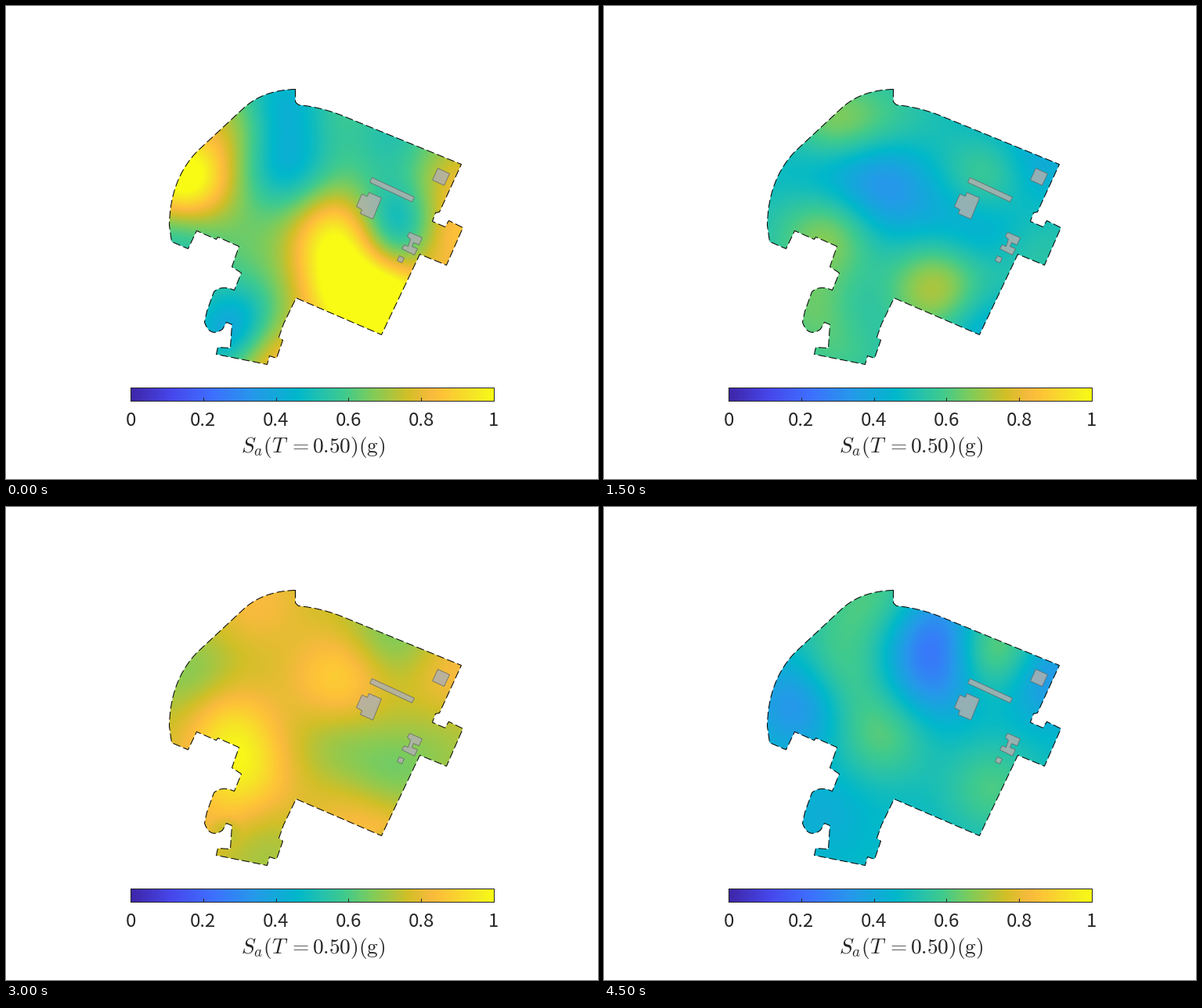
Recreate the animation shown at these times as a matplotlib script. Size 756x605 px, loop 5000 ms.

```python
import numpy as np
import matplotlib.pyplot as plt
from matplotlib.animation import FuncAnimation
from matplotlib.colors import LinearSegmentedColormap
from matplotlib.patches import Polygon, Rectangle

W, H, DPI = 756, 605, 100
PX = 72 / DPI  # one pixel in points
INK = "#262626"
plt.rcParams["mathtext.fontset"] = "cm"

STOPS = {0: "#3e26a8", 7: "#4747eb", 14: "#3e6fff", 21: "#2797eb",
         29: "#01b8ca", 33: "#24c1ae", 37: "#3fca8e", 42: "#81cc59",
         48: "#d1bf27", 52: "#f8ba3d", 54: "#fec338", 60: "#f5e924",
         63: "#f9fb15"}
CMAP = LinearSegmentedColormap.from_list(
    "sea_to_sun", [(k / 63, c) for k, c in STOPS.items()])


def bend(a, ctrl, b, n=16):
    """Quadratic curve from a to b."""
    t = np.linspace(0, 1, n)[:, None]
    a, ctrl, b = map(np.array, (a, ctrl, b))
    return [*((1 - t) ** 2 * a + 2 * t * (1 - t) * ctrl + t * t * b)]


def box(cx, cy, w, h, turn=np.radians(24.8)):
    """Corners of a turned rectangle."""
    u = np.array([np.cos(turn), np.sin(turn)]) * w / 2
    v = np.array([-np.sin(turn), np.cos(turn)]) * h / 2
    return [(cx, cy) + i * u + j * v
            for i, j in ((-1, -1), (1, -1), (1, 1), (-1, 1))]


SITE = [
    (369, 106), (369, 122), *bend((373, 126), (405, 129), (437, 143)),
    (581, 202), (553, 263), (548, 264), (544, 275), (560, 282), (565, 274),
    (583, 283), (562, 331), (528, 317), (479, 420), (370, 373), (354, 406),
    (348, 423), (353, 427), (345, 450), (336, 447), (333, 458), (268, 445),
    (270, 436), (286, 437), (288, 407), (281, 404),
    *bend((276, 413), (260, 424), (253, 404)), (256, 390),
    *bend((265, 365), (275, 356), (291, 363)), (300, 341), (288, 333),
    (297, 307), (270, 295), (268, 298), (243, 287), (232, 310), (211, 301),
    *bend((208, 280), (209, 222), (243, 186)),
    *bend((303, 130), (328, 107), (369, 106))]

HALL = [(454, 240), (461, 243), (463, 238), (479, 245), (468, 272),
        (452, 265), (454, 260), (447, 256)]
WINGS = [(515, 289), (531, 296), (527, 305), (520, 302), (518, 307),
         (525, 310), (521, 318), (505, 310), (508, 305), (513, 307),
         (516, 298), (512, 294)]
BUILDINGS = [box(555, 218, 16.5, 16.5), box(492.5, 234.5, 59.5, 6.7),
             box(503.5, 323.5, 6.7, 6.7), HALL, WINGS]

# Field raster: one sample per pixel over the site
X0, X1, Y0, Y1 = 205, 587, 103, 461
GX, GY = np.meshgrid(np.arange(X0, X1 + 1.0), np.arange(Y0, Y1 + 1.0))


def field(mean, *points, reach=42):
    """Smooth surface through key points (x, y, value), else near the mean."""
    px, py, v = np.array(points, float).T

    def bell(x, y, k=slice(None)):
        return np.exp(-((x - px[k]) ** 2 + (y - py[k]) ** 2) / (2 * reach ** 2))

    weights = np.linalg.solve(bell(px[:, None], py[:, None]), v - mean)
    out = mean + sum(w * bell(GX, GY, k) for k, w in enumerate(weights))
    return np.clip(out, 0, 1)


ridge = field(.65, (225, 222, 1.05), (262, 252, .82), (215, 295, .58),
              (350, 120, .44), (357, 205, .44), (290, 150, .70),
              (493, 165, .53), (498, 283, .52), (573, 225, .80),
              (565, 300, .83), (425, 295, 1.0), (432, 365, 1.15),
              (490, 390, 1.2), (295, 418, .44), (335, 450, .78))

hollows = field(1.35, (493, 230, .68), (535, 258, .87), (500, 357, .58),
                (290, 362, .85), (228, 215, .94), reach=36)

peaks = field(.46, (292, 150, .83), (350, 125, .57), (425, 150, .53),
              (490, 212, .74), (555, 205, .27), (350, 290, .37),
              (500, 270, .57), (545, 310, .58), (422, 360, .84),
              (480, 400, .35), (310, 400, .37))

valley = field(.50, (358, 145, .60), (355, 222, .22), (285, 210, .33),
               (487, 172, .36), (430, 258, .32), (490, 295, .36),
               (570, 215, .60), (285, 290, .89), (222, 285, .66),
               (335, 310, .74), (265, 385, .87), (310, 440, .78),
               (425, 380, .60), (490, 350, .57))

plateau = field(1.6, (266, 406, .95), (294, 420, .95), (485, 430, .85),
                reach=36)

shore = field(.50, (318, 120, .66), (425, 218, .75), (492, 165, .34),
              (570, 210, .64), (235, 215, .37), (285, 285, .90),
              (305, 345, .92), (425, 305, .39), (495, 345, .32),
              (560, 300, .41), (265, 400, .65), (325, 430, .45),
              (420, 395, .62), (479, 418, .67))

waves = field(.47, (300, 140, .59), (355, 110, .58), (425, 160, .28),
              (420, 220, .29), (497, 180, .60), (565, 215, .36),
              (250, 250, .35), (300, 215, .56), (355, 290, .61),
              (495, 360, .60), (280, 390, .42))

FIELDS = [ridge, hollows, peaks, (peaks + valley) / 2, valley,
          plateau, (plateau + shore) / 2, shore, (shore + waves) / 2, waves]

fig = plt.figure(figsize=(W / DPI, H / DPI), dpi=DPI, facecolor="white")
ax = fig.add_axes([0, 0, 1, 1])
ax.axis("off")


def raster(data, left, right, top, bottom):
    return ax.imshow(data, cmap=CMAP, vmin=0, vmax=1, aspect="auto",
                     interpolation="nearest",
                     extent=(left, right + 1, bottom + 1, top))


def shape(points, **style):
    """Polygon whose whole coordinates lie on pixel centres."""
    return ax.add_patch(Polygon(np.array(points) + .5, **style))


surface = raster(FIELDS[0], X0, X1, Y0, Y1)
surface.set_clip_path(shape(SITE, fill=False, ec="black", lw=PX,
                            ls=(0, (10, 4)), zorder=3))
for points in BUILDINGS:
    shape(points, fc=(.69, .69, .69, .84), ec=(.4, .4, .4, .9), lw=.8 * PX,
          joinstyle="miter", zorder=2)

# Colour bar
L, R, T, B = 159, 623, 488, 505
raster(np.linspace(0, 1, 256)[None, :], L, R, T, B)
ax.add_patch(Rectangle((L, T), R - L, B - T, fill=False, ec=INK, lw=PX,
                       zorder=3))
for k in range(6):
    x = L + (R - L) * k / 5
    ax.plot([x, x], [B - 4, B], color=INK, lw=PX, zorder=3)
    ax.text(x, 537, f"{k / 5:g}", ha="center", va="baseline", color=INK,
            family="Noto Sans CJK JP", fontsize=24 * PX)
ax.text(392, 571, r"$S_a(T\:=0.50)(\mathrm{g})$", ha="center",
        va="baseline", color=INK, fontsize=27.3 * PX)

ax.set_xlim(0, W)
ax.set_ylim(H, 0)


def draw(i):
    surface.set_data(FIELDS[i % len(FIELDS)])
    return [surface]


anim = FuncAnimation(fig, draw, frames=len(FIELDS), interval=500, repeat=True,
                     repeat_delay=0, blit=False)
plt.show()
```
